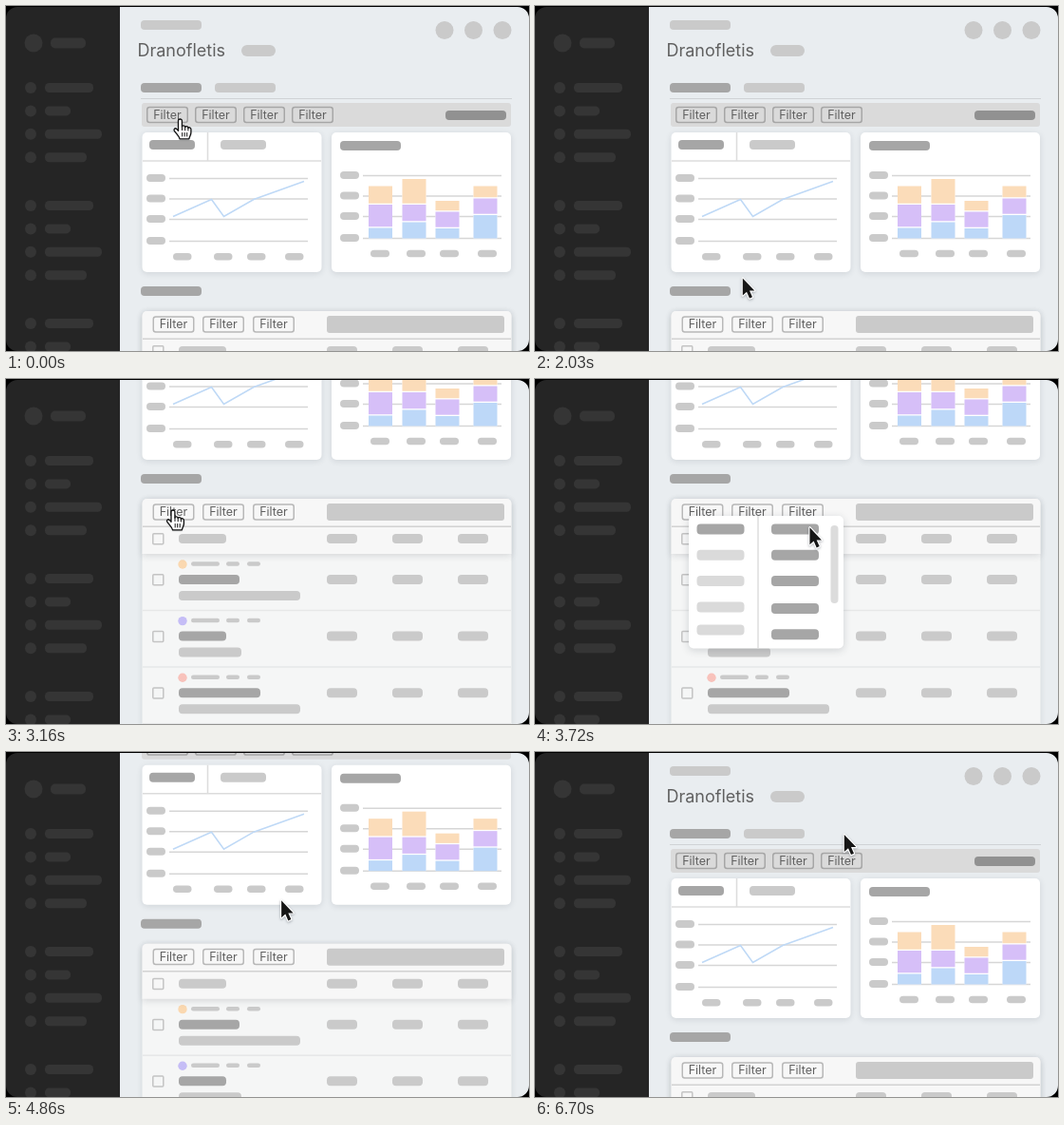
Animation, 551 px wide and 363 px high, one loop 6.86 s. Source, as an HTML page with a canvas:

```html
<!DOCTYPE html>
<html lang="en">
<head>
<meta charset="utf-8">
<title>Dashboard walkthrough</title>
<style>
html, body { margin: 0; width: 100%; height: 100%; overflow: hidden; background: #000; }
canvas { display: block; width: 551px; height: 363px; }
</style>
</head>
<body>
<canvas id="stage"></canvas>
<script>
const W = 551, H = 363, LOOP = 6860, TICK = 80;
const DARK = '#a6a6a6', MID = '#cacaca', LINE = '#d6d6d6', INK = '#606060';
const ORANGE = '#fbdcb9', PURPLE = '#d6bff8', BLUE = '#bdd8f8';
const dpr = window.devicePixelRatio || 1;

function prepare(canvas, w, h) {
  canvas.width = Math.round(w * dpr);
  canvas.height = Math.round(h * dpr);
  const c = canvas.getContext('2d');
  c.scale(dpr, dpr);
  return c;
}

const stage = prepare(document.getElementById('stage'), W, H);
let g = stage;

// ---------- drawing helpers ----------
function box(x, y, w, h, r, fill) {
  g.beginPath();
  g.roundRect(x, y, w, h, r);
  g.fillStyle = fill;
  g.fill();
}

// Placeholder bar between x1 and x2, centred on y
function bar(x1, x2, y, fill = MID, h = 10, r = Math.min(4, h / 2)) {
  box(x1, y - h / 2, x2 - x1, h, r, fill);
}

function dot(x, y, r, fill) {
  g.beginPath();
  g.arc(x, y, r, 0, Math.PI * 2);
  g.fillStyle = fill;
  g.fill();
}

function line(points, color, width) {
  g.beginPath();
  points.forEach(([x, y]) => g.lineTo(x, y));
  g.strokeStyle = color;
  g.lineWidth = width;
  g.stroke();
}

function frame(x, y, w, h, r, color, width = 1.5) {
  g.beginPath();
  g.roundRect(x, y, w, h, r);
  g.strokeStyle = color;
  g.lineWidth = width;
  g.stroke();
}

function shaded(alpha, blur, dy, draw) {
  g.save();
  g.shadowColor = `rgba(40,50,60,${alpha})`;
  g.shadowBlur = blur * dpr;
  g.shadowOffsetY = dy * dpr;
  draw();
  g.restore();
}

function text(str, x, y, size, align) {
  g.font = `400 ${size}px Inter, Roboto, sans-serif`;
  g.textAlign = align;
  g.fillStyle = INK;
  g.fillText(str, x, y);
}

function filterButton(x, y, color) {
  frame(x + 0.75, y + 0.75, 42.5, 16, 2.5, color);
  text('Filter', x + 22, y + 12.8, 12.5, 'center');
}

// ---------- page parts ----------
function sidebar() {
  const tone = '#353535';
  g.fillStyle = '#252525';
  g.fillRect(0, 0, 120, H);
  dot(29, 39, 9.5, tone);
  bar(47, 84, 39, tone, 11, 5);
  const widths = [51, 27, 60, 44];
  for (let group = 0; group < 3; group++) {
    widths.forEach((w, i) => {
      const y = 86 + group * 124 + i * 24.4;
      dot(26, y, 6, tone);
      bar(41, 41 + w, y, tone, 10, 4.5);
    });
  }
}

function header() {
  bar(142, 206, 20);
  [462, 492.5, 523].forEach(x => dot(x, 25.5, 9.5, MID));
  text('Dranofletis', 138.5, 52.5, 18, 'left');
  bar(248, 284, 47, MID, 12, 6);
  bar(142, 206, 86, DARK);
  bar(220, 284, 86);
  line([[142, 97.5], [533, 97.5]], '#d0d3d5', 1.2);
  box(143, 102, 389, 25, 3, '#dadada');
  for (let i = 0; i < 4; i++) filterButton(148 + i * 51, 105.7, DARK);
  bar(463, 527, 115, '#919191');
}

function card(x) {
  shaded(0.13, 6, 1.5, () => box(x, 133, 189, 147, 5, '#fff'));
}

function axes(x1, x2, pillX, rows) {
  rows.forEach(y => {
    line([[x1, y + 0.5], [x2, y + 0.5]], LINE, 1.5);
    bar(pillX, pillX + 20, y, MID, 8);
  });
}

function lineChart() {
  card(143.5);
  bar(151, 199, 146, DARK);
  bar(226, 274, 146);
  line([[144, 163], [332, 163]], '#dcdcdc', 1.5);
  line([[212.5, 133], [212.5, 163]], '#dcdcdc', 1.5);
  axes(172, 318, 148, [181, 202.5, 224, 247]);
  line([[176, 221.5], [216.5, 203.5], [229.5, 221.5], [261, 203.5], [314, 184.5]], '#bfd9f6', 1.6);
  [176, 219, 254, 294].forEach(x => bar(x, x + 19.5, 263.7, MID, 7.5));
}

function barChart() {
  card(343);
  bar(352, 416, 147, DARK);
  axes(376, 522, 352, [178, 199.5, 221, 244]);
  const bars = [
    [382, 189, 208.5, 233],
    [417.5, 181.5, 208.5, 227],
    [452.5, 204.5, 216, 233.5],
    [492.5, 189, 202, 219.5]
  ];
  bars.forEach(([x, top, mid, low]) => {
    g.fillStyle = '#fff';
    g.fillRect(x, top, 25, 55.5 + 189 - top);
    [[top, mid, ORANGE], [mid, low, PURPLE], [low, 245.3, BLUE]].forEach(([a, b, fill]) => {
      g.fillStyle = fill;
      g.fillRect(x, a + 0.5, 25, b - a - 1.3);
    });
  });
  [384, 422, 457, 497].forEach(x => bar(x, x + 20, 260.5, MID, 7.5));
}

function cells(y) {
  frame(154.8, y - 5.2, 11, 11, 1, '#c4c4c4');
  [338, 407, 476].forEach(x => bar(x, x + 32, y));
}

function table() {
  bar(142, 206, 300, DARK);
  shaded(0.12, 6, 1, () => box(143.5, 321, 389, 400, 5, '#f5f6f6'));

  const rows = [
    ['#fad8b0', 246, 310],
    ['#c5bdf6', 232, 248],
    ['#f8c2bb', 268, 310]
  ];
  rows.forEach(([color, titleEnd, noteEnd], i) => {
    const y = 390 + i * 59.6;
    dot(186, y, 4.7, color);
    [[195, 225], [232, 246], [254, 268]].forEach(([a, b]) => bar(a, b, y - 0.5, MID, 4.5));
    bar(182, titleEnd, y + 16, DARK);
    bar(182, noteEnd, y + 33, MID);
    cells(y + 16);
    line([[144, y + 48.5], [532, y + 48.5]], '#e6e7e8', 1.5);
  });

  shaded(0.15, 7, 2, () => box(143.5, 321, 389, 58, [5, 5, 0, 0], '#f7f7f7'));
  [154.5, 207, 260].forEach(x => filterButton(x, 326.2, '#b8b8b8'));
  box(338, 326, 187, 18, 3, MID);
  line([[144, 350.2], [532, 350.2]], '#d2d2d2', 1.5);
  bar(182, 232, 363);
  cells(363);
}

// ---------- popup, prepared once so that it fades as a group ----------
const PAD = 14;
const menu = document.createElement('canvas');
g = prepare(menu, 192, 170);
g.translate(PAD, PAD);
shaded(0.18, 9, 2, () => box(0, 0, 163, 139.5, 5, '#fff'));
line([[73, 0], [73, 139.5]], '#d9d9d9', 1.3);
[14, 41.3, 68.5, 96, 120].forEach((y, i) => bar(8.5, 58.5, y, i ? '#dadada' : DARK, 11));
[14, 41.3, 68.5, 97.5, 124.7].forEach(y => bar(87, 137, y, DARK, 11));
box(149.5, 10, 8, 82, 4, '#dcdcdc');
g = stage;

// ---------- pointers ----------
const arrowShape = new Path2D('M.8 1.5V19.5L5 15.7L8 22.6L11 21.3L8 14.6H13.3Z');
const handShape = new Path2D(
  'M-2 1.8C-2-.6 1.9-.6 1.9 1.8V8C2.2 6.5 5.2 6.6 5.2 8.5C5.7 7.2 8.4 7.4 8.4 9.4' +
  'C9 8.3 11.4 8.7 11.4 10.8V14C11.4 17 9.7 18 9.4 20.8H-.4C-1 18-3.6 16-6 12.6' +
  'C-7.4 10.6-5.4 8.9-3.7 10.4L-2 12.2Z');
const handLines = new Path2D('M2 8V11.5M5.2 8.6V11.8M8.4 9.4V12M2.2 14.5V18M4.7 14.5V18M7.2 14.5V18');

function pointer(x, y, isHand) {
  g.save();
  g.translate(x, y);
  g.lineJoin = 'round';
  g.lineCap = 'round';
  if (isHand) {
    shaded(0.3, 2, 1, () => { g.fillStyle = '#fff'; g.fill(handShape); });
    g.strokeStyle = '#111';
    g.lineWidth = 1.3;
    g.stroke(handShape);
    g.lineWidth = 1;
    g.stroke(handLines);
  } else {
    g.strokeStyle = '#fff';
    g.lineWidth = 2.4;
    shaded(0.35, 2.5, 1, () => g.stroke(arrowShape));
    g.fillStyle = '#161616';
    g.fill(arrowShape);
  }
  g.restore();
}

// ---------- motion ----------
// Progress 0..1 in n ticks, the first of which is taken at time `first`
const step = (t, first, n) => Math.min(n, Math.max(0, Math.floor((t - first) / TICK + 1))) / n;
const easeOut = p => 1 - (1 - p) ** 2;
const easeBoth = p => p < 0.5 ? 4 * p ** 3 : 1 - 4 * (1 - p) ** 3;

const moves = [
  [1060, 6, 218, 285],
  [2440, 9, 176, 138],
  [3320, 7, 290, 155],
  [4860, 9, 171, 121],
  [5660, 9, 325, 85.5]
];

const scrolls = [
  [2190, 1, 75],
  [2440, 9, 195],
  [4530, 1, 120],
  [4860, 9, 0]
];

// first tick in, first tick out, ticks out, x, y
const popups = [
  [80, 1710, 5, 155.5, 119.5],
  [3320, 4210, 4, 162, 144],
  [5660, 6380, 5, 155.5, 119.5]
];

function pointerAt(t) {
  if (t < 80) return [183.5, 119, true];
  let x = 188, y = 117;
  for (const [first, n, toX, toY] of moves) {
    const p = easeBoth(step(t, first, n));
    x += (toX - x) * p;
    y += (toY - y) * p;
  }
  return [x, y, t >= 3160 && t < 3320];
}

function scrollAt(t) {
  return scrolls.reduce((s, [first, n, to]) => s + (to - s) * easeBoth(step(t, first, n)), 0);
}

function render(t) {
  g.clearRect(0, 0, W, H);
  g.fillStyle = '#000';
  g.fillRect(0, 0, W, H);
  g.save();
  g.beginPath();
  g.roundRect(0, 1, W, H - 1, 12);
  g.clip();
  g.fillStyle = '#e9edf0';
  g.fillRect(120, 0, W - 120, H);

  g.save();
  g.translate(0, -scrollAt(t));
  header();
  lineChart();
  barChart();
  table();
  g.restore();

  sidebar();
  for (const [fadeIn, fadeOut, n, x, y] of popups) {
    g.globalAlpha = easeOut(step(t, fadeIn, 5)) * (1 - easeOut(step(t, fadeOut, n)));
    if (g.globalAlpha > 0) g.drawImage(menu, x - PAD, y - PAD, 192, 170);
  }
  g.globalAlpha = 1;
  pointer(...pointerAt(t));
  g.restore();
}

const start = performance.now();
function tick() {
  render((performance.now() - start) % LOOP);
  requestAnimationFrame(tick);
}
tick();
</script>
</body>
</html>
```
